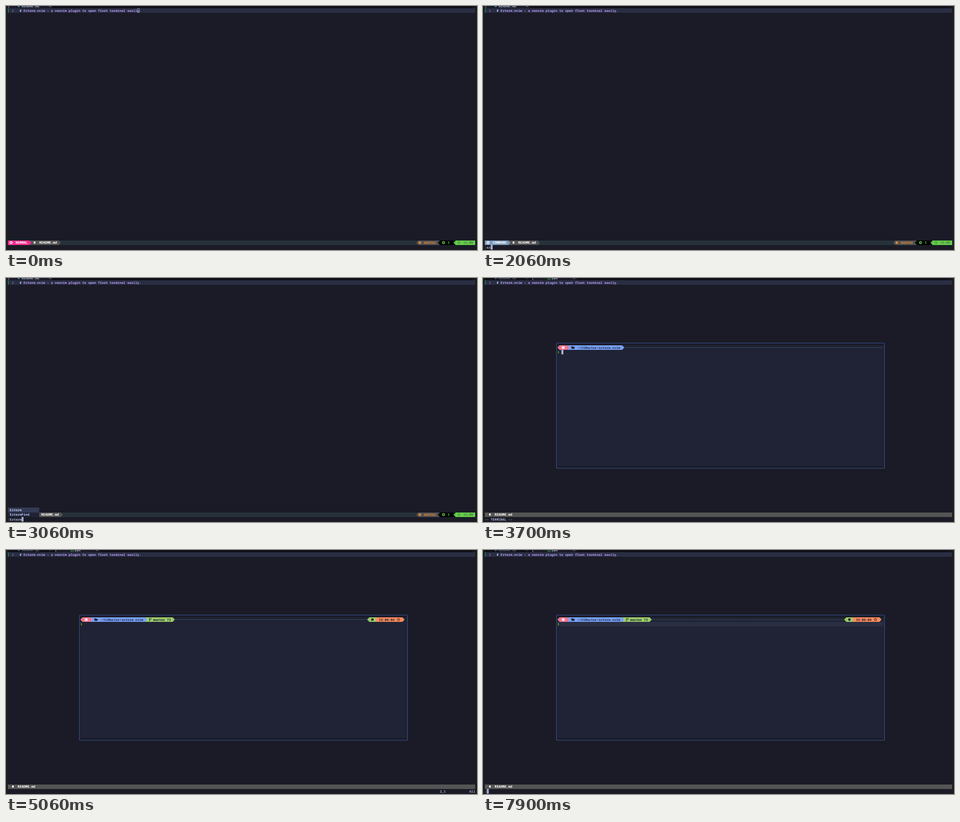
An HTML page that plays this animation: 1037x540 px, repeating every 8000 ms.

```html
<!DOCTYPE html>
<html lang="en">
<head>
<meta charset="utf-8">
<title>Floating terminal</title>
<style>
html, body { margin: 0; width: 100%; height: 100%; overflow: hidden; background: #1b1d1e; }
svg { display: block; width: 1037px; height: 540px; }
text {
  font: 600 7.205px "Noto Sans Mono", "DejaVu Sans Mono", monospace;
  text-rendering: geometricPrecision;
  white-space: pre;
}
</style>
</head>
<body>
<svg id="stage" viewBox="0 0 1037 540"></svg>
<script>
const LOOP = 8000;
const CW = 1029 / 238, RH = 10.27;
const C = {
  bg: '#1a1b26', dark: '#101116', line: '#292e42', float: '#1f2335', edge: '#3d59a1',
  fg: '#a9b1d6', light: '#c0caf5', cursor: '#a9b0d8', purple: '#bb9af7',
  pink: '#f92d8f', steel: '#7c9cbc', gray: '#545454', bar: '#26323a',
  orange: '#ef8a2c', lime: '#62d048', red: '#f7768e', blue: '#7aa2f7',
  green: '#9ece6a', coral: '#ff8a5c', prompt: '#5fd700', ink: '#1c2233'
};
const stage = document.getElementById('stage');

// Terminal grid: column and row to pixels
const X = col => +(4 + col * CW).toFixed(2);
const Y = row => +(-5.2 + row * RH).toFixed(2);
const mid = row => Y(row) + RH / 2;

const rect = (x, y, w, h, fill) =>
  `<rect x="${x}" y="${y}" width="${w}" height="${h}" fill="${fill}"/>`;
// Cell backgrounds snap to whole pixels vertically
const cells = (col, row, n, fill) => {
  const top = Math.round(Y(row)), bottom = Math.round(Y(row + 1));
  return rect(X(col), top, (n * CW).toFixed(2), bottom - top, fill);
};
const text = (col, row, str, fill) =>
  `<text x="${X(col)}" y="${(Y(row) + 7.9).toFixed(2)}" fill="${fill}">${str}</text>`;
const path = (d, fill, stroke = 'none', w = 1) =>
  `<path d="${d}" fill="${fill}" stroke="${stroke}" stroke-width="${w}"/>`;
const circle = (x, y, r, fill, stroke = 'none', w = 1) =>
  `<circle cx="${x}" cy="${y}" r="${r}" fill="${fill}" stroke="${stroke}" stroke-width="${w}"/>`;
const tip = (col, row, dir, fill) => {
  const from = X(dir > 0 ? col : col + 1), to = X(dir > 0 ? col + 1 : col);
  const top = Math.round(Y(row)), bottom = Math.round(Y(row + 1));
  return path(`M${from} ${top}L${to} ${(top + bottom) / 2}L${from} ${bottom}Z`, fill);
};

const downArrow = (x, y, fill) =>
  path(`M${x - 1.4} ${y - 2.8}h2.8v2.6h1.5l-2.9 3l-2.9 -3h1.5Z`, fill);
const gear = (x, y) => circle(x, y, 2.2, 'none', '#fff', 1.3) +
  `<circle cx="${x}" cy="${y}" r="3" fill="none" stroke="#fff" stroke-width=".9" stroke-dasharray="1.2 1.15"/>`;
const clock = (x, y, color) => circle(x, y, 2.7, 'none', color, .9) +
  path(`M${x} ${y - 1.6}v1.8h1.3`, 'none', color, .8);
const cross = (x, color) => path(`M${x - 2} -2l4 4m0 -4l-4 4`, 'none', color, .9);

function tabs(term) {
  const first = term ? '#545c7e' : C.fg;
  let s = rect(4, 0, 1029, 5, C.dark) + rect(1024.3, 0, 8.7, 5, '#16161e');
  s += term ? rect(107.8, 0, 99, 5, C.bg) + rect(109, 0, 1.2, 4, '#7895b8')
            : rect(4, 0, 99, 5, C.bg) + rect(5.3, 0, 1.2, 4, '#7895b8');
  s += path('M25.3 0h5.6l-2.8 3Z', term ? '#2f6c91' : '#3f9cc4');
  s += text(7, 0, 'README.md', first) + cross(97, first);
  if (term) {
    s += path('M142.6 -2v5h6.2v-5M144 1.2h2.6', 'none', '#3fa34d', .9);
    s += text(34, 0, 'zsh', C.light) + cross(200.5, C.fg);
  }
  return s;
}

function buffer() {
  return cells(0, 1, 238, C.line) + rect(4, 5, 2, 10, '#266d6a') +
    text(2, 1, '1', '#737aa2') + text(6, 1, '#', C.light) +
    text(8, 1, 'Ezterm.nvim - a neovim plugin to open float terminal easily.', C.purple);
}

function statusLine(mode, fill, time) {
  const r = 51, y = mid(r), end = 5 + mode.length;
  return cells(0, r, 238, C.bar) +
    cells(end, r, 15, C.gray) + tip(end + 15, r, 1, C.gray) +
    cells(0, r, end, fill) + tip(end, r, 1, fill) +
    gear(11.2, y) + text(4, r, mode, '#fff') +
    downArrow(X(end + 2.6), y, '#fff') + text(end + 5, r, 'README.md', '#fff') +
    tip(208, r, -1, C.gray) + cells(209, r, 11, C.gray) +
    rect(908.6, y - 2.4, 4.8, 4.8, C.orange) + text(212, r, 'master', C.orange) +
    tip(219, r, -1, '#000') + cells(220, r, 8, '#000') +
    circle(963.2, y, 3.1, C.lime) +
    path(`M961.4 ${y}h3.6m-1.8 -1.8v3.6`, 'none', '#000', 1) +
    text(224, r, '1', C.lime) +
    cells(227, r, 1, '#000') + tip(227, r, -1, C.lime) + cells(228, r, 10, C.lime) +
    clock(997.2, y, '#557052') + text(232, r, time, '#557052');
}

function idleStatus() {
  const y = mid(51);
  return cells(0, 51, 238, C.gray) + path(`M4.8 ${y - 4}l3.8 4l-3.8 4`, 'none', '#7c7c7c', .7) +
    downArrow(15.2, y, '#fff') + text(5, 51, 'README.md', '#fff');
}

const cmd = str => text(0, 52, str, C.fg) + cells(str.length, 52, 1, C.cursor);

function popup() {
  return cells(0, 50, 16, '#343a55') + cells(0, 51, 16, '#1f2335') +
    text(1, 50, 'Ezterm', C.light) + text(1, 51, 'EztermFind', C.light);
}

function dots(from, to) {
  const y = mid(15);
  return `<path d="M${X(from) + 1} ${y}H${X(to)}" stroke="#586d72" stroke-width="1.1" stroke-dasharray="2.3 ${(CW - 2.3).toFixed(4)}"/>`;
}

function promptLine(full) {
  const r = 15, y = mid(r);
  let s = tip(37, r, -1, C.red) + cells(42, r, 28, C.blue) +
    cells(38, r, 4, C.red) + tip(42, r, 1, C.red) + circle(176.7, y, 3.2, '#f3e3ea');
  s += path(`M194.4 ${y + 2.8}v-5.6h2.8l.9 1h3v1.2h-4.6Z M195 ${y + 2.8}l1.9 -3.5h5.6l-1.8 3.5Z`, C.ink);
  s += text(47, r, '~/ViMaster/ezterm.nvim', '#20304f');
  if (!full) return s + tip(70, r, 1, C.blue) + dots(71, 203);
  s += cells(70, r, 14, C.green) + tip(70, r, 1, C.blue) + tip(84, r, 1, C.green);
  s += path(`M316 ${y - 2.4}v4.8M319.4 ${y - 2.2}v1.2q0 1.4 -3.4 1.6`, 'none', C.ink, .9) +
    circle(316, y - 2.6, .9, C.ink) + circle(316, y + 2.6, .9, C.ink) + circle(319.4, y - 2.4, .9, C.ink);
  s += text(74, r, 'master ?3', C.ink) + dots(85, 183);
  s += tip(183, r, -1, C.green) + cells(184, r, 4, C.green) + rect(804.2, y - 2.5, 5, 5, C.ink);
  s += tip(187, r, -1, C.coral) + cells(188, r, 13, C.coral) + tip(201, r, 1, C.coral);
  return s + text(189, r, '15:06:04', C.ink) + clock(864, y, C.ink);
}

// cursor: column inside the float, or -1 when hidden
function floatTerm({ full, cursor, cursorLine }) {
  const onPrompt = cursor === 0, y = mid(16);
  let s = `<rect x="161.8" y="144" width="722" height="277" rx="2" fill="${C.bg}" stroke="${C.edge}" stroke-width="1.2"/>`;
  s += rect(X(37), 149, (166 * CW).toFixed(2), 267, C.float);
  if (cursorLine) s += cells(37, 16, 166, C.line);
  s += promptLine(full);
  if (cursor >= 0) s += cells(37 + cursor, 16, 1, onPrompt ? C.prompt : C.cursor);
  return s + path(`M165 ${y - 2.6}l1.9 2.6l-1.9 2.6`, 'none', onPrompt ? C.float : C.prompt, 1.1);
}

const ruler = pos => text(220, 52, pos, C.fg) + text(235, 52, 'All', C.fg);

const normal = time => statusLine('NORMAL', C.pink, time);
const command = str => statusLine('COMMAND', C.steel, '15:06') + cmd(str);
const hollowCursor = () =>
  `<rect x="${X(66) + .4}" y="5.5" width="3.7" height="9" fill="none" stroke="${C.cursor}" stroke-width=".8"/>`;
const blockCursor = () => cells(66, 1, 1, C.cursor) + text(66, 1, 'y', C.bg);
const terminal = (opts, bottom) => idleStatus() + floatTerm(opts) + bottom;
const insertMode = full =>
  terminal({ full, cursor: 2 }, text(0, 52, '-- TERMINAL --', C.fg));
const browse = (cursor, bottom) =>
  terminal({ full: true, cursor, cursorLine: true }, bottom);

const scenes = [
  [0, () => normal('15:05') + hollowCursor()],
  [500, () => normal('15:06') + blockCursor()],
  [1200, () => command(':')],
  [1760, () => command(':e')],
  [2060, () => command(':ez')],
  [2630, () => command(':ezt')],
  [2730, () => command(':ezter')],
  [2830, () => command(':ezterm')],
  [3060, () => command(':Ezterm') + popup()],
  [3700, () => insertMode(false)],
  [3830, () => insertMode(true)],
  [5060, () => terminal({ full: true, cursor: -1 }, ruler('2,1'))],
  [5160, () => browse(0, ruler('2,1'))],
  [5460, () => browse(1, ruler('2,4-2'))],
  [5800, () => browse(0, ruler('2,1'))],
  [7900, () => browse(-1, cmd(':'))]
];

let shown = -1;
function render(ms) {
  const index = scenes.findLastIndex(([start]) => ms >= start);
  if (index === shown) return;
  shown = index;
  const [start, draw] = scenes[index];
  stage.innerHTML = rect(4, 0, 1029, 539, C.bg) + tabs(start >= 3700) + buffer() + draw();
}

const origin = performance.now();
function tick() {
  render((performance.now() - origin) % LOOP);
  requestAnimationFrame(tick);
}
tick();
</script>
</body>
</html>
```
